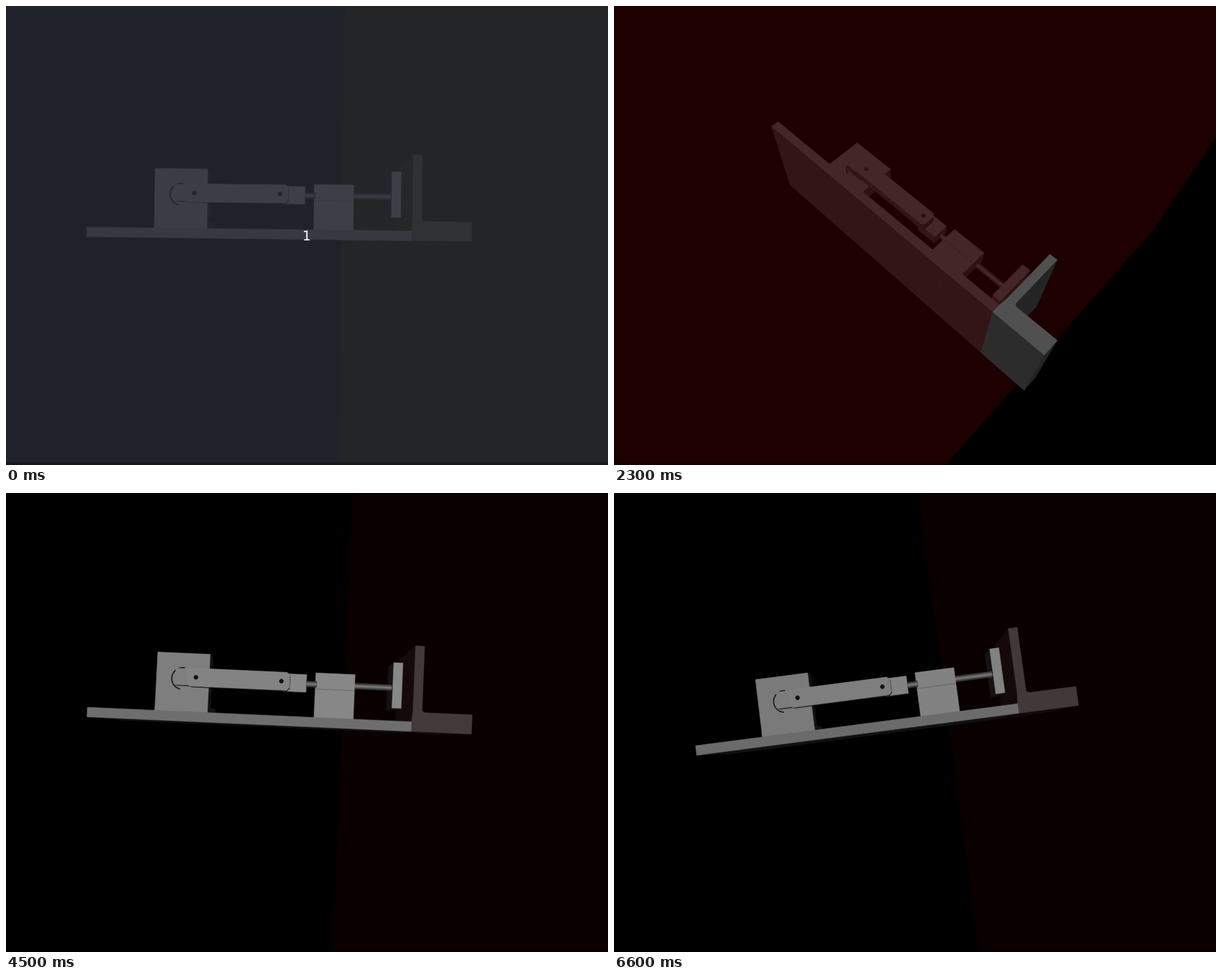
These frames come from a looping animation (857x654 px, 7.2 s). An HTML page with a canvas:

```html
<!DOCTYPE html>
<html lang="en">
<head>
<meta charset="utf-8">
<title>Crank slider</title>
<style>
html, body { margin: 0; width: 100%; height: 100%; overflow: hidden; background: #000; }
canvas { display: block; }
</style>
</head>
<body>
<canvas id="stage" width="857" height="654"></canvas>
<script>
const ctx = document.getElementById('stage').getContext('2d');
const LOOP = 7200, STEP = 100, WIDTH = 857, HEIGHT = 654;
const CX = 428, CY = 327, CAMERA = 840;
const FRONT = 18, BACK = 183, SPLIT = 149;
const FULL = 2 * Math.PI;

const REST = { roll: .7, pitch: .2 };
const SWINGS = [
  { from: 500, to: 700, roll: 2.3, pitch: 1 },
  { from: 800, to: 1200, roll: -.6, pitch: .3 },
  { from: 1300, to: 2000, roll: 47.3, pitch: 33 },
  { from: 2200, to: 3000, roll: 20.25, pitch: 12 },
  { from: 3000, to: 3800, roll: -.9, pitch: -1.7 },
  { from: 4400, to: 5200, roll: 26.9, pitch: 24.2 },
  { from: 5200, to: 5400, roll: 31.8, pitch: 26.4 },
  { from: 5500, to: 6000, roll: 21.5, pitch: 15.5 },
  { from: 6000, to: 6400, roll: -7.46, pitch: 2.2 }
];

// Each side of the split: backdrop colour and how strongly shading shows on it
const CLEAR = { back: [0, 0, 0], factor: 1 };
const MODES = {
  dim: [{ back: [31, 35, 41], factor: .2 }, { back: [36, 37, 39], factor: .1 }],
  right: [CLEAR, { back: [10, 0, 0], factor: .52 }],
  none: [CLEAR, CLEAR],
  left: [{ back: [30, 0, 0], factor: .47 }, CLEAR]
};

let pose, mode;

const rgb = c => `rgb(${c.map(Math.round)})`;
const mix = (a, b, part) => a + (b - a) * part;
const box = (x, y, w, h) => [[x, y], [x + w, y], [x + w, y + h], [x, y + h]];

function poseAt(time) {
  let { roll, pitch } = REST;
  for (const s of SWINGS) {
    const part = Math.min(1, Math.max(0, (time - s.from) / (s.to - s.from)));
    roll = mix(roll, s.roll, part);
    pitch = mix(pitch, s.pitch, part);
  }
  const r = roll * Math.PI / 180, p = pitch * Math.PI / 180;
  return { pitch, cr: Math.cos(r), sr: Math.sin(r), cp: Math.cos(p), sp: Math.sin(p) };
}

function project(x, y, z) {
  const { cr, sr, cp, sp } = pose;
  const px = x * cr - y * sr, py = x * sr + y * cr;
  const k = CAMERA / (CAMERA + z * cp - py * sp);
  return [CX + px * k, CY + (py * cp + z * sp) * k];
}

// x and y are as seen head-on at the depth `plane`
function place(x, y, plane, z = plane) {
  const scale = 1 + plane / CAMERA;
  return project(x * scale, y * scale, z);
}

function shade(gray, isRight = false) {
  const { back, factor } = MODES[mode][+isRight];
  return rgb(back.map(c => c + gray * factor));
}

function trace(points, closed) {
  ctx.beginPath();
  points.forEach(p => ctx.lineTo(...p));
  if (closed) ctx.closePath();
}

function fill(points, color) {
  trace(points, true);
  ctx.fillStyle = ctx.strokeStyle = color;
  ctx.lineWidth = .5;
  ctx.fill();
  ctx.stroke();
}

function line(points, color, width) {
  trace(points, false);
  ctx.strokeStyle = color;
  ctx.lineWidth = width;
  ctx.stroke();
}

function arc(x, y, z, r, from, to) {
  return Array.from({ length: 21 }, (_, i) => {
    const a = mix(from, to, i / 20);
    return place(x + r * Math.cos(a), y + r * Math.sin(a), z);
  });
}

const area = p => p.reduce((sum, [x, y], i) => {
  const [nx, ny] = p[(i + 1) % p.length];
  return sum + x * ny - nx * y;
}, 0);

function prism(outline, front, back, gray, isRight = false) {
  const near = outline.map(([x, y]) => place(x, y, front));
  const far = outline.map(([x, y]) => place(x, y, front, back));
  const under = Math.min(44, 14 + 1.4 * pose.pitch);
  const side = 18 + .6 * pose.pitch;
  outline.forEach(([x, y], i) => {
    const j = (i + 1) % outline.length;
    const quad = [near[i], near[j], far[j], far[i]];
    if (area(quad) >= 0) return;
    const dx = outline[j][0] - x, dy = outline[j][1] - y;
    fill(quad, shade(-dx > Math.abs(dy) ? under : side, isRight));
  });
  fill(near, shade(gray, isRight));
}

function rod(x0, x1, glow) {
  const ends = [x0, x1].map(x => place(x, -57, 80));
  for (let i = 0; i < 3; i++) {
    line(ends, shade(38 + 23 * i + (14 + 13 * i) * glow), 9 - 3.2 * i);
  }
}

function drawRoom() {
  const [x, depth, top, bottom] = [134, 1400, -1300, 1600];
  const edge = [project(x, bottom, depth), project(x, top, depth), project(x, top, -300)];
  ctx.fillStyle = rgb(MODES[mode][0].back);
  ctx.fillRect(0, 0, WIDTH, HEIGHT);
  trace([...edge, [5000, edge[2][1]], [5000, edge[0][1]]], true);
  ctx.fillStyle = rgb(MODES[mode][1].back);
  ctx.fill();
  ctx.fillStyle = 'rgba(10, 0, 8, .35)';
  ctx.fillRect(0, 650, WIDTH, 4);
}

function drawMotor(face, dark) {
  const z = 88;
  prism(box(-217, -18, 75, 16), z, z + 78, face);
  prism(box(-217, -93.4, 75, 92), z, z + 27, face);
  line(arc(-179.7, -57, z, 15.5, 1.75, 4.9), dark, 1.6);
}

function drawArm(face, dark) {
  const z = 65, top = -72, bottom = -46, cut = 4;
  const ends = [-173, -27];
  prism([
    [ends[0] + cut, top], [ends[1] - cut, top], [ends[1], top + cut], [ends[1], bottom - cut],
    [ends[1] - cut, bottom], [ends[0] + cut, bottom], [ends[0], bottom - cut], [ends[0], top + cut]
  ], z, z + 15, face);
  for (const x of [-160.7, -38.7]) fill(arc(x, -59, z, 3, 0, FULL), dark);
}

function drawSupport(face) {
  const z = 65;
  prism(box(10, -73, 56, 70), z, z + 28, face);
  line([place(10, -50, z), place(66, -50, z)], shade(face * .75), .9);
}

function drawWall(base) {
  const [left, right, foot, radius] = [150.5, 163.5, -22, 4];
  prism([[left, -117], [right, -117], [right, foot - radius], [right + 1, foot - 1.5],
    [right + radius, foot], [right + radius, -8], [left, -8]], FRONT, BACK, base, true);
}

function drawBase(base, cameraX) {
  const plate = () => prism(box(-313, -8.3, SPLIT + 313, 13.8), FRONT, BACK, base);
  const foot = () => prism([[SPLIT, -9], [150.5, -22], [235, -22], [235, 5.5], [SPLIT, 5.5]],
    FRONT, BACK, base, true);
  const order = cameraX < SPLIT ? [foot, plate] : [plate, foot];
  order.forEach(draw => draw());
}

function drawMachine() {
  const glow = Math.exp(-Math.abs(pose.pitch) / 7);
  const face = 80 + 63 * glow, base = 80 + 37 * glow, bright = face + 5 * glow;
  const dark = shade(30 - 14 * glow);
  const cameraX = CAMERA * pose.sp * pose.sr;

  // [x used for depth order, draw]
  const parts = [
    [-180, () => drawMotor(face - 6 * glow, dark)],
    [-175, () => prism(box(-190, -71, 27, 23.5), 72, 88, face - 3 * glow)],
    [-16, () => prism(box(-36, -70, 33, 25), 68, 88, bright)],
    [-10, () => drawArm(face, dark)],
    [5, () => rod(-3, 12, glow)],
    [38, () => drawSupport(bright)],
    [92, () => rod(66, 119, glow)],
    [127, () => prism(box(120.3, -92.5, 13.2, 65), 55, 115, bright)],
    [157, () => drawWall(base)]
  ];
  const distance = ([x]) => Math.abs(x - cameraX);
  parts.sort((a, b) => distance(b) - distance(a));
  parts.forEach(([, draw]) => draw());

  drawBase(base, cameraX);
  if (pose.pitch > 6) drawScrewHoles();
}

function drawScrewHoles() {
  const hole = (x, z, width) => {
    const [px, py] = project(x, 5.6, z);
    ctx.fillStyle = shade(75, x > SPLIT);
    ctx.fillRect(px - width / 2, py - .5, width, 1);
  };
  for (const x of [20, 59]) for (const z of [71, 107]) hole(x, z, 2.6);
  hole(40, 90, 1.4);
  hole(190, 105, 1.4);
}

function drawLabel() {
  ctx.font = '19px "DejaVu Sans", sans-serif';
  ctx.textAlign = 'center';
  ctx.fillStyle = '#fff';
  ctx.fillText('1', CX, 334);
}

function modeAt(time) {
  if (time < STEP) return 'dim';
  if (pose.pitch > 25) return 'left';
  return pose.pitch > 22 ? 'none' : 'right';
}

function render() {
  const time = Math.floor(performance.now() % LOOP / STEP) * STEP;
  pose = poseAt(time);
  mode = modeAt(time);
  drawRoom();
  drawMachine();
  if (mode === 'dim') drawLabel();
  requestAnimationFrame(render);
}
render();
</script>
</body>
</html>
```
